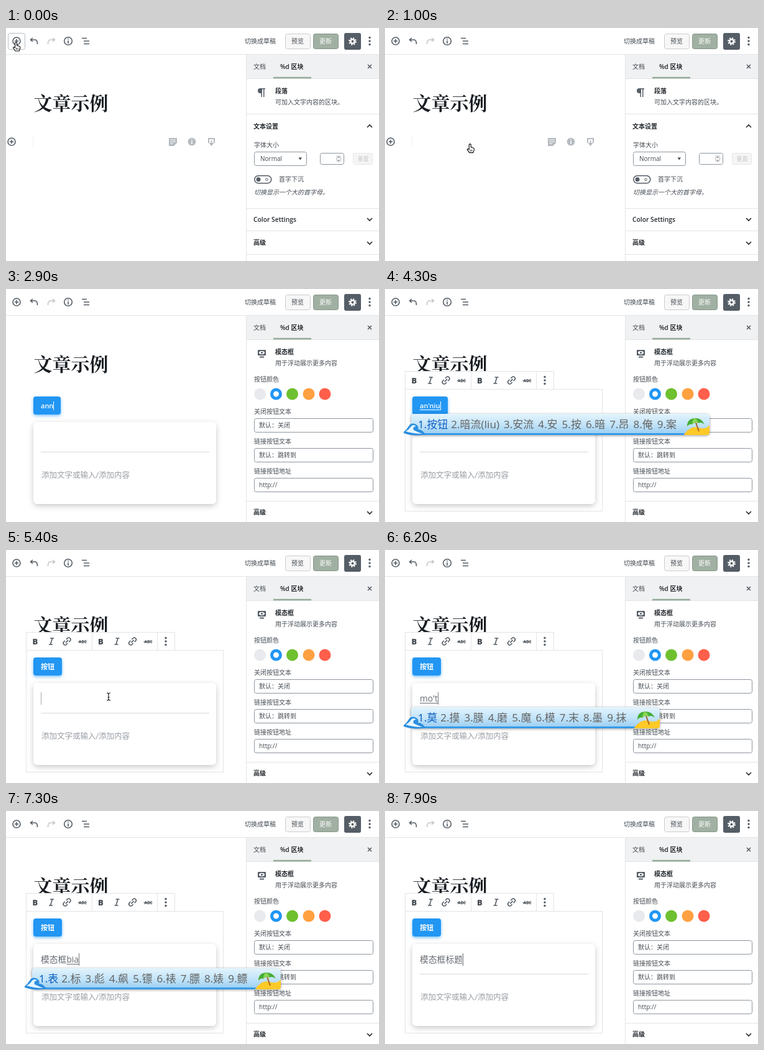
Recreate the animation shown at these times as an HTML page. Size 600 by 375 pixels, loop 8 s.

```html
<!DOCTYPE html>
<html lang="zh-CN">
<head>
<meta charset="utf-8">
<title>区块编辑器</title>
<style>
html, body { margin: 0; width: 100%; height: 100%; overflow: hidden; background: #fff; }
body { position: relative; font: 10px "Open Sans", "Noto Sans CJK SC", "Noto Sans CJK", sans-serif; color: #444b52; }
svg { position: absolute; left: 0; top: 0; display: block; }
text { fill: #444b52; white-space: pre; }
.b { font-weight: 600; fill: #23282d; }
.h1 { font: 700 30px "Noto Serif CJK SC", "Noto Serif", "Noto Sans CJK SC", serif; fill: #191e23; }
.line { stroke: #e2e4e7; fill: none; }
.field { fill: #fff; stroke: #8d96a0; }
.ico { fill: none; stroke: #555d66; stroke-width: 1.6; }
.pale { opacity: .35; }
.soft { fill: #b5bac0; stroke: none; }
.btn, .title, .ime { position: absolute; white-space: nowrap; }
.btn { left: 44px; top: 173px; height: 29px; padding: 0 12px; border-radius: 4px; background: #2196f3;
  color: #fff; font-size: 11px; font-weight: 600; line-height: 29px; box-shadow: 0 2px 5px #2196f399; }
.title { left: 56px; top: 229px; height: 20px; line-height: 20px; font-size: 13.8px; font-weight: 500; color: #666b71; }
.hint { opacity: .65; }
.pre { text-decoration: underline; text-underline-offset: 2px; }
.caret::after { content: ""; position: absolute; width: 1px; height: 14px; margin: 8px 0 0 0; background: #fff; }
.title.caret::after { height: 20px; margin: 0; background: #777; }
.title.dim::after { background: #aaa; }
.ime { left: 42px; height: 34px; box-sizing: border-box; padding: 0 46px 0 11px; border-radius: 5px;
  background: linear-gradient(#e3f4fd, #bfe2f8 60%, #9ed0f3); border-bottom: 3px solid #359be9;
  box-shadow: 0 1px 4px #0006; font: 17px/34px "Noto Sans", "Noto Sans CJK SC", "Noto Sans CJK", sans-serif; color: #666; }
.ime span { margin-right: 7px; }
.ime span:first-child { color: #0b5fc4; margin-right: 5px; }
.ime svg { overflow: visible; }
.ime .beach { left: auto; right: 0; }
</style>
</head>
<body>
<svg width="600" height="375" viewBox="0 0 600 375">
  <defs>
    <g id="plus" class="ico"><circle r="6"/><path d="M-3.2 0H3.2M0-3.2V3.2"/></g>
    <path id="undo" class="ico" d="M-2-5L-5.5-2L-2 1M-5-2H2Q5.5-2 5.5 5"/>
    <path id="down" class="ico" d="M-4-2L0 2L4-2" style="stroke:#23282d"/>
    <g id="dots" fill="#555d66"><circle cy="-5.5" r="1.7"/><circle r="1.7"/><circle cy="5.5" r="1.7"/></g>
    <g id="format">
      <text x="-4.5" y="5" font-size="13" font-weight="800">B</text>
      <path class="ico" d="M24-5H30M22 5H28M27.5-5L24.500 5"/>
      <g class="ico" transform="translate(51) rotate(-45)"><path d="M-1.500-3H-4A3 3 0 0 0-4 3H-1.500M1.500-3H4A3 3 0 0 1 4 3H1.500M-3 0H3"/></g>
      <text x="70" y="2.500" font-size="6.500" font-weight="700">ABC</text><path d="M69 .5H83" stroke="#555d66"/>
    </g>
    <filter id="shade" x="-20%" y="-20%" width="140%" height="150%"><feDropShadow dx="0" dy="3" stdDeviation="5" flood-opacity=".22"/></filter>
  </defs>

  <path class="line" d="M0 42.500H600"/>
  <rect id="hover" x="3.500" y="8.500" width="27" height="26" rx="3" fill="#fff" stroke="#b5bcc2"/>
  <use href="#plus" x="17" y="21"/>
  <use href="#undo" x="45" y="21"/>
  <use href="#undo" class="pale" transform="translate(73 21) scale(-1 1)"/>
  <g class="ico"><circle cx="100" cy="21" r="6.300"/><path d="M100 20V25M100 17V18.600"/>
    <path d="M122 16.500H130M125 21H134M125 25.500H134"/></g>
  <text x="384" y="25">切换成草稿</text>
  <rect x="449.500" y="9.500" width="40" height="24" rx="3" fill="#f7f7f7" stroke="#ccc"/>
  <text x="459" y="25">预览</text>
  <rect x="494.500" y="9.500" width="40" height="24" rx="3" fill="#a0b0a2" stroke="#87988a"/>
  <text x="504" y="25" style="fill:#fff" font-weight="500">更新</text>
  <rect x="544" y="8" width="27" height="27" rx="3" fill="#555d66"/>
  <g fill="none" stroke="#fff" transform="translate(557.500 21.500)">
    <circle r="3.300" stroke-width="2.600"/><circle r="5.400" stroke-width="2" stroke-dasharray="2.100 2.140"/></g>
  <use href="#dots" x="585" y="21"/>

  <text class="h1" x="44.500" y="131.500">文章示例</text>

  <g id="empty">
    <use href="#plus" x="9" y="183"/>
    <path class="line" d="M43.500 175V191" opacity=".6"/>
    <path class="soft" d="M262 177H275V185L270 190H262Z"/>
    <path d="M264 180H273M264 183H273M264 186H269" stroke="#fff"/>
    <circle class="soft" cx="299" cy="183" r="6.300"/><path d="M299 182V187M299 179V180.700" stroke="#fff" stroke-width="1.600"/>
    <path d="M327 184H326V178H335V184H334M330.500 181V187" fill="none" stroke="#b5bac0" stroke-width="2"/><path class="soft" d="M326.500 185H334.500L330.500 190Z"/>
  </g>

  <g id="block">
    <rect id="outline" class="line" x="32.500" y="161.500" width="317" height="196"/>
    <g id="label"><rect x="318" y="162" width="32" height="13" fill="#b4b6b8"/><text x="321" y="172" font-size="9" style="fill:#fff">模态框</text></g>
    <rect x="44" y="214" width="294" height="132" rx="7" fill="#fff" filter="url(#shade)"/>
    <path d="M56 262.500H327" stroke="#d8dadd"/>
    <text id="hint" x="57" y="304" font-size="12.500" font-weight="500" style="fill:#989da3">添加文字或输入/添加内容</text>
    <g id="cue"><path d="M57.500 290V308" stroke="#555"/><use href="#plus" x="320" y="299"/></g>
    <g id="tools">
      <rect x="32.500" y="132.500" width="239" height="29" fill="#fff" stroke="#e2e4e7"/>
      <path class="line" d="M138.500 132V161M243.500 132V161"/>
      <use href="#format" x="47" y="147"/><use href="#format" x="152.500" y="147"/>
      <use href="#dots" x="257" y="147"/>
    </g>
  </g>

  <rect x="386" y="43" width="214" height="332" fill="#fff"/>
  <rect x="386" y="43" width="214" height="38" fill="#f0f1f2"/>
  <path class="line" d="M386.500 43V375M386 81.500H600"/>
  <path d="M430 80H491" stroke="#93aa97" stroke-width="2.500"/>
  <text x="398" y="66">文档</text><text class="b" x="441" y="66">%d 区块</text>
  <path class="ico" d="M582 59L588 65M588 59L582 65"/>

  <g id="paragraph">
    <path fill="#555d66" d="M417 97H409A4 4 0 0 0 409 105H410.500V111H412V98.500H414V111H415.500V98.500H417Z"/>
    <text class="b" x="433" y="105">段落</text><text x="433" y="122.500">可加入文字内容的区块。</text>
    <path class="line" d="M386 138.500H600M386 290.500H600M386 326.500H600M386 364.500H600"/>
    <text class="b" x="398" y="162">文本设置</text><use href="#down" transform="translate(585 158) scale(1 -1)"/>
    <text x="399" y="192">字体大小</text>
    <rect class="field" x="399.500" y="199.500" width="84" height="22" rx="3"/>
    <text x="409" y="214" font-size="10">Normal</text><path d="M470.500 208.500H476L473.250 212.500Z" fill="#444"/>
    <rect class="field" x="505.500" y="201.500" width="38" height="18" rx="3"/>
    <rect x="531.500" y="205.500" width="7" height="10" rx="3" fill="#fff" stroke="#bbb"/>
    <path d="M533.300 209L535 207L536.700 209M533.300 212L535 214L536.700 212" fill="none" stroke="#555"/>
    <rect x="558.500" y="201.500" width="31" height="18" rx="2" fill="#f5f5f5" stroke="#e8e8e8"/>
    <text x="565.500" y="214" font-size="9" style="fill:#c5c8cb">重置</text>
    <rect class="ico" x="399.800" y="237.800" width="27" height="12" rx="6"/>
    <circle cx="406" cy="243.800" r="3.500" fill="#555d66"/><circle cx="419.500" cy="243.800" r="1.800" fill="none" stroke="#555d66"/>
    <text x="439" y="247">首字下沉</text>
    <text x="399" y="268" font-style="italic">切换显示一个大的首字母。</text>
    <text class="b" x="398" y="311.500" font-size="10.300">Color Settings</text><use href="#down" x="585" y="308"/>
    <text class="b" x="398" y="349">高级</text><use href="#down" x="585" y="346"/>
  </g>

  <g id="modal">
    <rect x="405" y="98" width="13" height="9" rx="1" fill="#555d66"/><path d="M408 109.500H415" stroke="#555d66" stroke-width="2"/>
    <ellipse cx="411.500" cy="102.500" rx="4.500" ry="2.800" fill="#fff"/><circle cx="411.500" cy="102.500" r="1.600" fill="#555d66"/>
    <text class="b" x="433" y="105">模态框</text><text x="433" y="122.500">用于浮动展示更多内容</text>
    <text x="399" y="149">按钮颜色</text>
    <circle cx="408.500" cy="169" r="9.500" fill="#e8eaed"/>
    <circle cx="434.500" cy="169" r="7" fill="#fff" stroke="#2196f3" stroke-width="5"/>
    <circle cx="460.500" cy="169" r="9.500" fill="#6fc02f"/>
    <circle cx="487" cy="169" r="9.500" fill="#ffa041"/>
    <circle cx="513" cy="169" r="9.500" fill="#ff5f4b"/>
    <text x="399" y="201">关闭按钮文本</text><rect class="field" x="399.500" y="208.500" width="191" height="22" rx="3"/><text x="407" y="223">默认：关闭</text>
    <text x="399" y="249">链接按钮文本</text><rect class="field" x="399.500" y="256.500" width="191" height="22" rx="3"/><text x="407" y="271">默认：跳转到</text>
    <text x="399" y="297">链接按钮地址</text><rect class="field" x="399.500" y="304.500" width="191" height="22" rx="3"/><text x="407" y="319">http://</text>
    <path class="line" d="M386 341.500H600"/>
    <text class="b" x="398" y="363">高级</text><use href="#down" x="585" y="360"/>
  </g>
</svg>

<div class="btn" id="btn"></div>
<div class="title" id="title"></div>

<div class="ime" id="ime">
  <b id="words" style="font-weight:400"></b>
  <svg width="30" height="34">
    <path d="M-12 29Q-7 25-4 20Q0 13 8 17Q13 20 11 25Q17 24 23 33Q4 37-12 31Z" fill="#2c8fe0"/>
    <path d="M-9 28Q-3 25 0 20Q4 16 8 20Q2 20 4 26Q10 29 18 32Q3 32-9 28Z" fill="#e6f6ff"/>
    <circle cx="-3" cy="15" r="1.500" fill="#fff"/>
  </svg>
  <svg class="beach" width="42" height="34">
    <path d="M1 33Q12 18 24 22T42 18V30Q42 34 38 34H1Z" fill="#ffc928"/>
    <path d="M20 14L25 28" stroke="#a8642a" stroke-width="2"/>
    <path d="M6 20Q6 8 18 7Q29 6 34 17Q28 12 24 15Q18 12 14 17Q10 15 6 20Z" fill="#45ae35"/>
    <path d="M14 17Q14 10 18 7Q23 9 24 15Q18 12 14 17Z" fill="#8bd657"/>
  </svg>
</div>

<svg width="600" height="375" style="pointer-events:none">
  <g id="hand"><path d="M-2.500-5Q-1-7 .5-5V-1L5 .5Q6 1 5.500 4L4 8H-2L-5.500 3Q-5 1-2.500 2.500Z" fill="#fff" stroke="#111" stroke-width="1.200"/><path d="M-.5 3V6M2 3V6" stroke="#111"/></g>
  <g id="beam" fill="none"><path d="M-3-6Q0-6 0-4Q0-6 3-6M0-5V5M-3 6Q0 6 0 4Q0 6 3 6" stroke="#fff" stroke-width="3"/><path d="M-3-6Q0-6 0-4Q0-6 3-6M0-5V5M-3 6Q0 6 0 4Q0 6 3 6M-1.500 1H1.500" stroke="#222" stroke-width="1.200"/></g>
</svg>

<script>
const LOOP = 8000, STEP = 100;
const $ = id => document.getElementById(id);
const START = { block: 0, modal: 0, tools: 0, outline: '', label: 0, cue: 0, btn: '', title: '', pre: '', focus: '', words: '', dim: 0 };

const candidates = {
  a: '啊 阿 呵 吖 嗄 锕 腌 安 按',
  an: '安 按 暗 案 岸 俺 氨 昂 鞍',
  "an'niu": '按钮 暗流(liu) 安流 安 按 暗 昂 俺 案',
  mo: '莫 摸 膜 磨 魔 模 末 墨 抹',
  "mo'tai": '模态 莫泰 魔胎 摸 膜 莫 魔 磨 末',
  "mo'tai'k": '模态框 莫泰 模态 魔胎 摸 膜 莫 魔 磨',
  biao: '表 标 彪 飙 镖 裱 膘 婊 鳔',
  "biao'ti": '标题 表题 表 标 彪 飙 镖 裱 膘'
};

// Changes that hold until overwritten by a later one.
const steps = [
  [1600, { block: 1, outline: '#555d66', label: 1, cue: 1 }],
  [2000, { modal: 1, tools: 1, outline: '#e2e4e7', label: 0, cue: 0, focus: 'btn' }],
  [2400, { tools: 0, outline: 'none', btn: 'a' }],
  [2500, { btn: 'an' }],
  [2700, { btn: 'ann' }],
  [3000, { btn: 'an' }],
  [3100, { btn: 'a' }],
  [3200, { btn: '' }],
  [3400, { tools: 1, outline: '#e2e4e7' }],
  ...compose(3900, ['a', 'an', "an'n", "an'ni", "an'niu"]),
  [4500, { btn: '按钮', pre: '', words: '' }],
  [5100, { focus: 'title' }],
  [5400, { dim: 1 }],
  [5900, { dim: 0 }],
  ...compose(5900, ['m', 'mo', 'mo', "mo't", "mo't", "mo'ta", "mo'tai", "mo'tai", "mo'tai'k"]),
  [7000, { title: '模态框', pre: '', words: '' }],
  ...compose(7100, ['b', 'bi', 'bia', 'biao', "biao't", "biao'ti"]),
  [7800, { title: '模态框标题', pre: '', words: '' }]
];

function compose(start, spellings) {
  let words = candidates[{ a: 'a', m: 'mo', b: 'biao' }[spellings[0]]];
  return spellings.map((pre, i) => {
    words = candidates[pre] || words;
    return [start + i * STEP, { pre, words }];
  });
}

// Pointer runs: start, end, from, to, shape.
const runs = [
  [0, 400, [17, 29], [17, 29], 'hand'],
  [400, 1300, [17, 29], [180, 250], 'hand'],
  [1300, 1900, [180, 250], [89, 189], 'beam'],
  [1900, 2400, [89, 189], [89, 189], 'beam'],
  [4800, 5100, [89, 189], [165, 236], 'beam'],
  [5100, 5900, [165, 236], [165, 236], 'beam']
];

const show = (id, on) => { $(id).style.display = on ? '' : 'none'; };

function write(id, text, state, hint) {
  const el = $(id), focused = state.focus === id, pre = focused ? state.pre : '';
  const span = (cls, str) => Object.assign(document.createElement('span'), { className: cls, textContent: str });
  el.replaceChildren(text || pre ? span('', text) : span('hint', hint), span('pre', pre));
  el.classList.toggle('caret', focused);
  el.classList.toggle('dim', !!state.dim);
}

function draw(t) {
  const s = Object.assign({}, START, ...steps.filter(([at]) => at <= t).map(([, change]) => change));
  show('hover', t < 500);
  show('empty', !s.block);
  for (const id of ['block', 'btn', 'title']) show(id, s.block);
  for (const id of ['tools', 'label', 'cue', 'modal']) show(id, s[id]);
  show('hint', !s.cue);
  show('paragraph', !s.modal);
  $('outline').style.stroke = s.outline;
  write('btn', s.btn, s, '请输入...');
  write('title', s.title, s, s.modal ? '' : '请输入模态框标题...');

  show('ime', s.words);
  $('ime').style.top = s.focus === 'btn' ? '201px' : '253px';
  $('words').innerHTML = s.words.split(' ').map((w, i) => `<span>${i + 1}.${w}</span>`).join('');

  const run = runs.find(([from, to]) => t >= from && t < to);
  for (const id of ['hand', 'beam']) show(id, run && run[4] === id);
  if (run) {
    const [from, to, a, b, shape] = run, p = (t - from) / (to - from), ease = p * p * (3 - 2 * p);
    const [x, y] = a.map((v, i) => v + (b[i] - v) * ease);
    $(shape).setAttribute('transform', `translate(${x} ${y})`);
  }
}

let last = -1;
const origin = performance.now();
function tick() {
  const t = Math.floor((performance.now() - origin) % LOOP / STEP) * STEP;
  if (t !== last) draw(last = t);
  requestAnimationFrame(tick);
}
tick();
</script>
</body>
</html>
```
